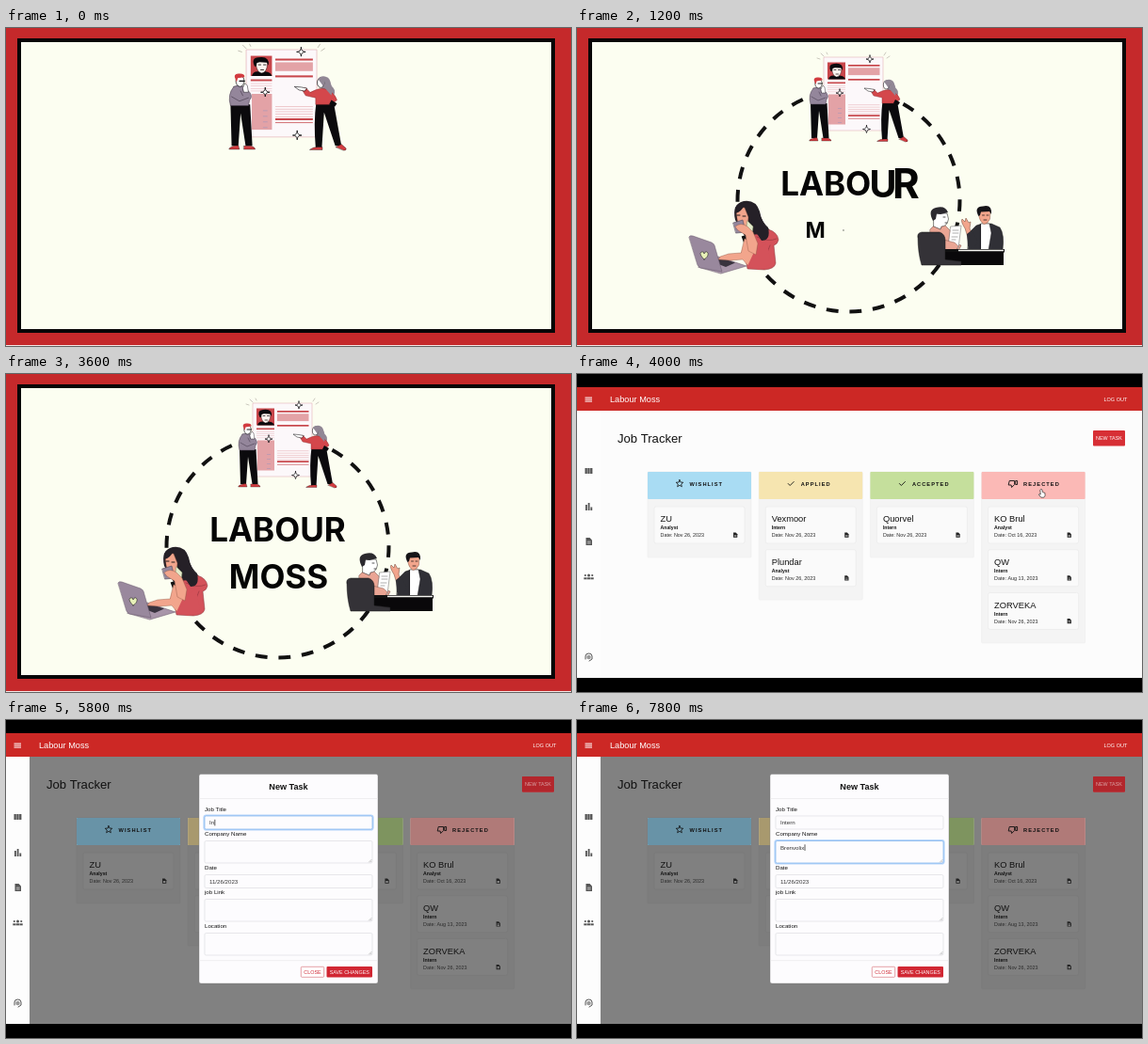
Recreate the animation shown at these times as an HTML page with a canvas. Size 600 px wide and 338 px high, loop 8 s.

```html
<!DOCTYPE html>
<html lang="en">
<head>
<meta charset="utf-8">
<title>Labour Moss</title>
<style>
  html, body { margin: 0; width: 100%; height: 100%; overflow: hidden; background: #000; }
  canvas { display: block; width: 100vw; height: 100vh; }
</style>
</head>
<body>
<canvas id="stage" width="600" height="338"></canvas>
<script>
const ctx = document.getElementById('stage').getContext('2d');
const LOOP = 8000, STEP = 200, PAGE_START = 3800, MODAL_START = 4210;
const SANS = '"Liberation Sans", Arial, sans-serif';
const RED = '#c5292b', INK = '#0b0a0d', SKIN = '#f2a58c', PINK = '#e3a2a6', ROSE = '#d4525a', MAUVE = '#94869b';

const clamp = v => Math.max(0, Math.min(1, v));

// ---------- drawing helpers ----------
function rect(x, y, w, h, fill) {
  ctx.fillStyle = fill;
  ctx.fillRect(x, y, w, h);
}
function box(x, y, w, h, radius, fill, stroke, width = 0.6) {
  ctx.beginPath();
  ctx.roundRect(x, y, w, h, radius);
  if (fill) { ctx.fillStyle = fill; ctx.fill(); }
  if (stroke) { ctx.strokeStyle = stroke; ctx.lineWidth = width; ctx.stroke(); }
}
function shape(d, fill, stroke, width = 0.7) {
  const path = new Path2D(d);
  if (fill) { ctx.fillStyle = fill; ctx.fill(path); }
  if (stroke) {
    ctx.strokeStyle = stroke;
    ctx.lineWidth = width;
    ctx.lineCap = ctx.lineJoin = 'round';
    ctx.stroke(path);
    ctx.lineCap = 'butt';
  }
}
function oval(x, y, rx, ry, fill, stroke) {
  ctx.beginPath();
  ctx.ellipse(x, y, rx, ry, 0, 0, 7);
  ctx.fillStyle = fill;
  ctx.fill();
  if (stroke) { ctx.strokeStyle = stroke; ctx.lineWidth = 0.6; ctx.stroke(); }
}
// y is the vertical middle of the capitals
function text(str, x, y, size, color = '#111', { weight = 400, align = 'left', spacing = 0 } = {}) {
  ctx.font = `${weight} ${size}px ${SANS}`;
  ctx.textAlign = align;
  ctx.letterSpacing = spacing + 'px';
  ctx.fillStyle = color;
  ctx.fillText(str, x, y + size * 0.36);
  ctx.letterSpacing = '0px';
}
function scaled(cx, cy, s, draw) {
  if (s <= 0) return;
  ctx.save();
  ctx.translate(cx, cy);
  ctx.scale(s, s);
  ctx.translate(-cx, -cy);
  draw();
  ctx.restore();
}
function pop(age) {
  if (age <= 0) return 0;
  return age < 250 ? age / 200 : 1.25 - 0.25 * clamp((age - 250) / 250);
}

// ---------- intro ----------
function sparkle(x, y) {
  const r = 4;
  shape(`M${x} ${y - r}Q${x} ${y} ${x + r} ${y}Q${x} ${y} ${x} ${y + r}Q${x} ${y} ${x - r} ${y}Q${x} ${y} ${x} ${y - r}Z`, '#fff', INK, 0.7);
}

function drawResume() {
  shape('M262 30 259 27M258 33 255 32M266 28 265 26M326 29 328 26M329 32 332 30', null, '#9b958a', 0.5);
  box(262, 31, 63, 78, 0, '#fcf8fa', '#e3b3bb');
  rect(266, 36.5, 19, 18, '#c8464b');
  shape('M267 54.5Q268 50.500 272 50.500L279 50.500Q284 51 285 54.5Z', INK);
  shape('M271 42H281L280.500 47Q279 52 275.500 52Q272 51 271 46Z', '#fff5ef', INK, 0.4);
  shape('M269.500 46Q266 38.500 273 38Q283 36.500 282 45L280.500 42.500 274 42 271.500 43 271 46Z', INK);
  shape('M273 44.500H275M277.500 44.500H279.500M275 49H277.500', null, INK, 0.7);
  rect(266, 57.5, 19, 1.6, '#c8464b');
  for (let y = 61; y < 68; y += 2.2) rect(266, y, 19, 0.6, '#edc3c8');
  rect(267, 70.5, 18, 32, PINK);
  for (let y = 85; y < 101; y += 5) rect(277, y, 4, 1, '#c09bb0');
  rect(288, 39, 33.5, 1.7, '#c8464b');
  rect(288, 42.3, 33.5, 7.8, PINK);
  rect(288, 54, 33.5, 1.7, '#c8464b');
  for (let y = 81.5; y < 91; y += 2.3) rect(288, y, 33.5, 0.6, '#e9b6bb');
  rect(288, 92.3, 33.5, 1.7, '#c8464b');
  rect(288, 95.8, 33.5, 0.8, '#d0686d');

  // thinking man
  shape('M248 80H265.500L267.500 117H261.500L257 88 255 117H249Z', INK);
  shape('M247 119Q249 117 255 116.500L256 120H247ZM260 117H266Q270 118 270 120H260Z', '#d23c40', INK, 0.3);
  shape('M251 64Q255 62 260 64L265 69Q268 73 265 76L264 81H248Q245 71 251 64Z', MAUVE, '#4c4152', 0.5);
  shape('M249 73 256 77 264 74M257 68 259 72', null, '#4c4152', 0.6);
  oval(256.5, 59, 3.7, 5, '#fff', INK);
  shape('M252.500 57.500Q250 53 255 52.500Q261 52 260.500 55.500L254.500 56.500 253.500 60Z', '#d23c40');
  shape('M259 65 261 61 263 63 264 69 260 69Z', '#fff', INK, 0.4);
  shape('M256 59H260.500', null, INK, 0.9);

  // presenting woman
  shape('M324.500 78H340L347 117H341.500L331.500 87 329.500 119H324Q322 96 324.500 78Z', INK);
  shape('M319 120Q322 118 326 118H330V120.500H319ZM342 118 347 115.500 351 119Q352 121 349 121Z', '#d23c40', INK, 0.3);
  shape('M327 57Q330 53 335 56Q338 59 337 63Q343 66 340 73L333 71 328 63Z', '#918795');
  oval(328.5, 60.5, 3.1, 4.4, '#fff', INK);
  shape('M326 57Q330 53 333 57L331 64Z', '#918795');
  shape('M324 67Q331 64 337 68Q342 72 343 76L338 80H324L324 74 315 72 312 67 315 65 319 69Z', '#d4474b', '#89272c', 0.4);
  shape('M339 67Q338 59 334 57L332 65 338 72Z', '#918795');
  shape('M314 68 309 67 305 64 311 64.500 316 65.500Z', '#fff', INK, 0.5);
  shape('M338 76 343 79 341 82 336 80Z', INK);
  sparkle(311, 33); sparkle(279, 69); sparkle(307.5, 107.5);
}

function drawLaptopGirl() {
  // hair and hoodie
  shape('M168 204Q164 187 177 184Q190 182 194 195Q196 207 204 214Q210 222 203 229L181 226Z', '#252027');
  shape('M181 226Q185 217 195 220L203 214Q213 217 214 225Q213 230 209 231L211 250Q210 256 199 257L181 256 178 241Z', ROSE, '#82343a', 0.5);
  shape('M191 222Q203 228 212 224M205 231Q201 244 191 250', null, '#8d343b', 0.6);
  // face and collar
  shape('M169 195Q172 189 178 191L182 201Q182 211 177 213L171 209Z', SKIN, '#6f4436', 0.4);
  shape('M168.500 197Q175 195 178 188Q184 196 188 214L196 226Q206 226 203 212Q196 206 193 194Q188 183 177 185Q166 187 168.500 197Z', '#252027');
  shape('M181 205 187 211 186 219 179 217Z', '#e4eac9', '#8d9c72', 0.5);
  shape('M170 199H173M176 200H179', null, INK, 0.9);
  // laptop
  shape('M129 254 150 243 180 253 153 261Z', '#a895a9', '#655569', 0.5);
  shape('M145 249 152 244 168 249.500 158 254Z', '#39333e');
  shape('M119 222Q120 220 123 221L143 228Q145 229 146 231L154 259 131 255Q129 254 128 252Z', '#99889d', '#655569', 0.5);
  shape('M135 246Q129 240 132 238Q135 237 135 240Q137 236 139 239Q140 243 135 246Z', '#e7f0b8', INK, 0.5);
  // arms and cup
  shape('M178 224 190 228 193 246Q188 255 181 252L176 246 163 247 150 246 152 243 161 240 174 239Z', SKIN, '#8c5342', 0.4);
  shape('M189 236 181 253 193 257 206 251 202 229Z', ROSE);
  shape('M166 207 176 204 179 217 169 218Z', MAUVE, '#51475a', 0.6);
  shape('M168 211Q174 206 181 211L187 217 192 229 190 241 182 237 179 220 171 215Z', SKIN, '#8c5342', 0.4);
}

function drawInterview() {
  // candidate
  shape('M375 214Q381 207 390 209L397 216 400 229 408 231 405 237 392 239 376 236Z', '#eaa594', '#6e453c', 0.5);
  shape('M379 197H393L394.500 203Q393 211 387 211L386 214 379 211Z', '#fff', INK, 0.5);
  shape('M378 205Q372 193 381 191Q391 188 394 196L386 198 382 197.500 381 203Z', '#2b292e');
  shape('M389 201H391M391 207H393', null, INK, 0.7);
  shape('M397 211 408 210 405 234 394 235Z', '#fff', '#777', 0.6);
  shape('M399 215H405M399 218H405M398 222H404M398 225H402', null, '#777', 0.6);
  shape('M389 225 401 228 405 232 402 237 386 237Z', '#eaa594', '#6e453c', 0.4);
  // recruiter
  shape('M417 217 424 210 430 208H440L449 212Q454 219 452 236H415Z', '#303036', INK, 0.5);
  shape('M429 208 438 208 440 218 437 236H429Z', '#fff', INK, 0.4);
  shape('M427 194H439L438.500 203Q436 208.500 432 208.500Q428 206 427 201Z', SKIN, '#694235', 0.4);
  shape('M426.500 200Q421 190 431 189.500Q441 187 440 198L438 195 429 195.500 428 199Z', '#161418');
  shape('M430.500 199H432.500M435 199H437M432 204H435', null, INK, 0.7);
  shape('M412 213Q407 205 409 203L412 206 413 202 416 207 418 206 417 213 421 222 416 225Z', SKIN, '#694235', 0.5);
  shape('M414 219 419 215 426 227 421 235 415 232Z', '#303036');
  // desk and chair
  rect(389, 235, 65, 3.5, '#111');
  rect(405, 235.7, 48, 1.5, '#f6f6f2');
  rect(391, 238, 62, 14, '#09080a');
  shape('M362 222Q361 218 366 217L385 217Q391 219 391 226V246L408 248V252H366Q362 239 362 222Z', '#343237', '#151417', 0.5);
}

function drawRing() {
  const r = 118, unit = 2 * Math.PI * r / 30;
  ctx.setLineDash([unit * 0.52, unit * 0.48]);
  ctx.lineDashOffset = 1.5;
  ctx.beginPath();
  ctx.arc(288.5, 183.5, r, 0, 2 * Math.PI);
  ctx.strokeStyle = '#111';
  ctx.lineWidth = 4;
  ctx.stroke();
  ctx.setLineDash([]);
}

function drawTitle(t) {
  let start = 350;
  for (const [word, center, baseline] of [['LABOUR', 288.5, 178], ['MOSS', 289.5, 228]]) {
    ctx.font = '700 35px Inter, sans-serif';
    ctx.textAlign = 'center';
    let x = center - ctx.measureText(word).width / 2;
    for (const letter of word) {
      const w = ctx.measureText(letter).width;
      scaled(x + w / 2, baseline - 13, pop(t - start), () => {
        ctx.fillStyle = '#050505';
        ctx.fillText(letter, x + w / 2, baseline);
      });
      x += w;
      start += 120;
    }
  }
}

function drawIntro(t) {
  rect(0, 0, 600, 338, RED);
  rect(0, 337, 600, 1, '#f3e6e4');
  rect(12, 11, 571, 313, '#080607');
  rect(16, 15, 563, 305, '#fcfef1');
  scaled(288.5, 183.5, pop(t - 50), drawRing);
  scaled(298.5, 73, pop(t + 310), drawResume);
  scaled(165, 223, pop(t - 350), drawLaptopGirl);
  scaled(408, 220, pop(t - 650), drawInterview);
  drawTitle(t);
}

// ---------- job tracker ----------
const columns = [
  { title: 'WISHLIST', color: '#a9dcf3', dimmed: '#6893a7', bottom: 195, cards: [['ZU', 'Analyst', 'Nov 26, 2023']] },
  { title: 'APPLIED', color: '#f6e5b0', dimmed: '#a8996e', bottom: 240, cards: [['Vexmoor', 'Intern', 'Nov 26, 2023'], ['Plundar', 'Analyst', 'Nov 26, 2023']] },
  { title: 'ACCEPTED', color: '#c5df9c', dimmed: '#7e945f', bottom: 195, cards: [['Quorvel', 'Intern', 'Nov 26, 2023']] },
  { title: 'REJECTED', color: '#fbb9b6', dimmed: '#b07a78', bottom: 286,
    cards: [['KO Brul', 'Analyst', 'Oct 16, 2023'], ['QW', 'Intern', 'Aug 13, 2023'], ['ZORVEKA', 'Intern', 'Nov 26, 2023']] }
];
const fields = [
  { label: 'Job Title', y: 102, h: 14 },
  { label: 'Company Name', y: 128.5, h: 23.5 },
  { label: 'Date', y: 164.5, h: 14 },
  { label: 'job Link', y: 190.5, h: 23.5 },
  { label: 'Location', y: 226.5, h: 23.5 }
];

function fileIcon(x, y, s, color) {
  scaled(x, y, s, () => {
    shape(`M${x - 3} ${y - 4}h4l2.500 2.500v5.500h-6.500z`, color);
    rect(x - 1.7, y - 0.3, 3.8, 0.8, '#ddd');
    rect(x - 1.7, y + 1.6, 3.8, 0.8, '#ddd');
  });
}

function drawColumnIcon(i, x, y) {
  if (i === 0) {
    let d = '';
    for (let k = 0; k < 10; k++) {
      const a = k * Math.PI / 5 - Math.PI / 2, r = k % 2 ? 1.8 : 4;
      d += `${k ? 'L' : 'M'}${x + r * Math.cos(a)} ${y + r * Math.sin(a)}`;
    }
    shape(d + 'Z', null, '#111', 0.8);
  } else if (i === 3) {
    shape(`M${x - 4} ${y - 3}h5v4l-3 3l-.5-2.500h-2.500zM${x + 2.5} ${y - 3}h1.500v4h-1.500z`, null, '#111', 0.9);
  } else {
    shape(`M${x - 3} ${y}l2 2l4-4`, null, '#111', 0.9);
  }
}

function drawBoard(dim) {
  rect(25, 39, 575, 284, '#fcfcfc');
  columns.forEach((col, i) => {
    const x = 75 + i * 118.2;
    box(x, 104, 110, col.bottom - 104, 1, '#f4f4f4', '#ededed');
    col.cards.forEach((_, k) => box(x + 7, 141 + k * 45.7, 96, 39, 2, '#fafafa', '#e7e7e7'));
  });
  rect(25, 39, 575, 284, `rgba(0,0,0,${0.49 * dim})`);

  text('Job Tracker', 43, 68.5, 13.1);
  const tint = (x, y, w, h, r, color, dimmed) => {
    box(x, y, w, h, r, color);
    ctx.globalAlpha = dim;
    box(x, y, w, h, r, dimmed);
    ctx.globalAlpha = 1;
  };
  tint(548, 60, 34, 16.5, 1, '#d72f35', '#b3262c');
  text('NEW TASK', 565, 68.5, 5.4, dim > 0.5 ? '#d9a4a6' : '#fff', { align: 'center' });
  columns.forEach((col, i) => {
    const x = 75 + i * 118.2;
    tint(x, 104, 110, 29, 1, col.color, col.dimmed);
    drawColumnIcon(i, x + 34, 116.5);
    text(col.title, x + 44.5, 116.5, 5.7, '#111', { weight: 700, spacing: 1.05 });
    col.cards.forEach(([name, role, date], k) => {
      const y = 154 + k * 45.7;
      text(name, x + 13.5, y, 9.3);
      text(role, x + 13.5, y + 9.5, 5.2, '#111', { weight: 700 });
      text('Date: ' + date, x + 13.5, y + 17.2, 5.4, '#2b2b2b');
      fileIcon(x + 93, y + 17.2, 0.65, '#222');
    });
  });
}

function drawChrome() {
  rect(0, 14, 600, 25, '#cc2825');
  rect(0, 39, 25, 284, '#fdfdfd');
  for (const y of [24.6, 26.6, 28.6]) rect(8.5, y, 7.5, 1, '#fff');
  text('Labour Moss', 35, 27, 9.2, '#fff');
  text('LOG OUT', 559.5, 27, 5.5, '#fff');
  const grey = '#555';
  for (const x of [8.5, 11.3, 14.1]) rect(x, 100, 2.3, 6, grey);
  rect(9, 139, 1.8, 6, grey); rect(11.7, 137, 1.8, 8, grey); rect(14.4, 141.5, 1.8, 3.5, grey);
  fileIcon(12.5, 178, 1, grey);
  for (const [x, r] of [[8.8, 1.1], [12.5, 1.5], [16.2, 1.1]]) {
    oval(x, 214, r, r, grey);
    rect(x - r - 0.4, 216.3, 2 * r + 0.8, 2, grey);
  }
  shape('M9 303V300Q9 297 12.500 297Q16 297 16 300V303L13 305', null, grey, 1);
  oval(12.5, 301, 2.3, 2.3, '#999');
}

function drawField({ label, y, h }, value, focused) {
  text(label, 211, y - 7.5, 6.15);
  if (focused) box(210.5, y - 0.5, 179, h + 1, 2, null, '#b9d7fb', 2.2);
  box(211, y, 178, h, 1.5, '#fdfcfe', focused ? '#6ba5e8' : '#d9d9dd');
  if (h > 20) shape(`M385.500 ${y + h - 1}l2.500-2.500M387.200 ${y + h - 1}l.8-.8`, null, '#888', 0.5);
  text(value, 216, y + 7, 6.15, '#333');
  if (focused) rect(216.4 + ctx.measureText(value).width, y + 3.8, 0.7, 6.6, '#111');
}

function drawModal(t) {
  const age = t - MODAL_START;
  if (age <= 0) return;
  ctx.save();
  ctx.globalAlpha = clamp(age / 150);
  ctx.translate(0, -20 * (1 - clamp(age / 300)) ** 2);
  box(205, 57.5, 190, 222.5, 2, '#fdfcfe', '#777', 0.4);
  text('New Task', 300, 70.5, 9.1, '#111', { weight: 700, align: 'center' });
  rect(205, 83, 190, 0.6, '#e6e6e8');

  const title = 'Intern'.slice(0, Math.max(0, Math.floor((t - 5400) / 200)));
  const company = 'Brenvolix'.slice(0, Math.max(0, Math.floor((t - 6900) / 100)));
  const values = [title, company, '11/26/2023', '', ''];
  const active = t < 5400 ? -1 : t < 6800 ? 0 : 1;
  fields.forEach((field, i) => drawField(field, values[i], i === active));

  rect(205, 255.5, 190, 0.6, '#e6e6e8');
  box(313.3, 262.3, 24.4, 11, 1, '#fff', '#d4606a');
  text('CLOSE', 325.5, 268, 5.4, '#cf2835', { align: 'center' });
  box(340.5, 262, 48.5, 11.6, 1, '#d12733');
  text('SAVE CHANGES', 364.8, 268, 5.4, '#fff', { align: 'center' });
  ctx.restore();
}

function drawPointer(t) {
  if (t >= 5600) return;
  const ease = p => p * p * (3 - 2 * p);
  const reach = ease(clamp((t - 3800) / 400)), leave = ease(clamp((t - 4600) / 600));
  const x = 420 + 146 * reach - 266 * leave, y = 180 - 112 * reach + 41 * leave;
  shape(`M${x - 1} ${y - 1}q1-1.500 2 0l.3 2.500l2.700 1v3l-1.200 1.700h-3l-2.500-3.200q.3-1.200 1.700-.2z`, '#fff', '#111', 0.6);
}

function drawPage(t) {
  rect(0, 0, 600, 338, '#000');
  drawBoard(clamp((t - MODAL_START) / 150));
  drawChrome();
  drawModal(t);
  drawPointer(t);
}

function frame(now) {
  const t = Math.floor(now % LOOP / STEP) * STEP;
  if (t < PAGE_START) drawIntro(t);
  else drawPage(t);
  requestAnimationFrame(frame);
}
requestAnimationFrame(frame);
</script>
</body>
</html>
```
